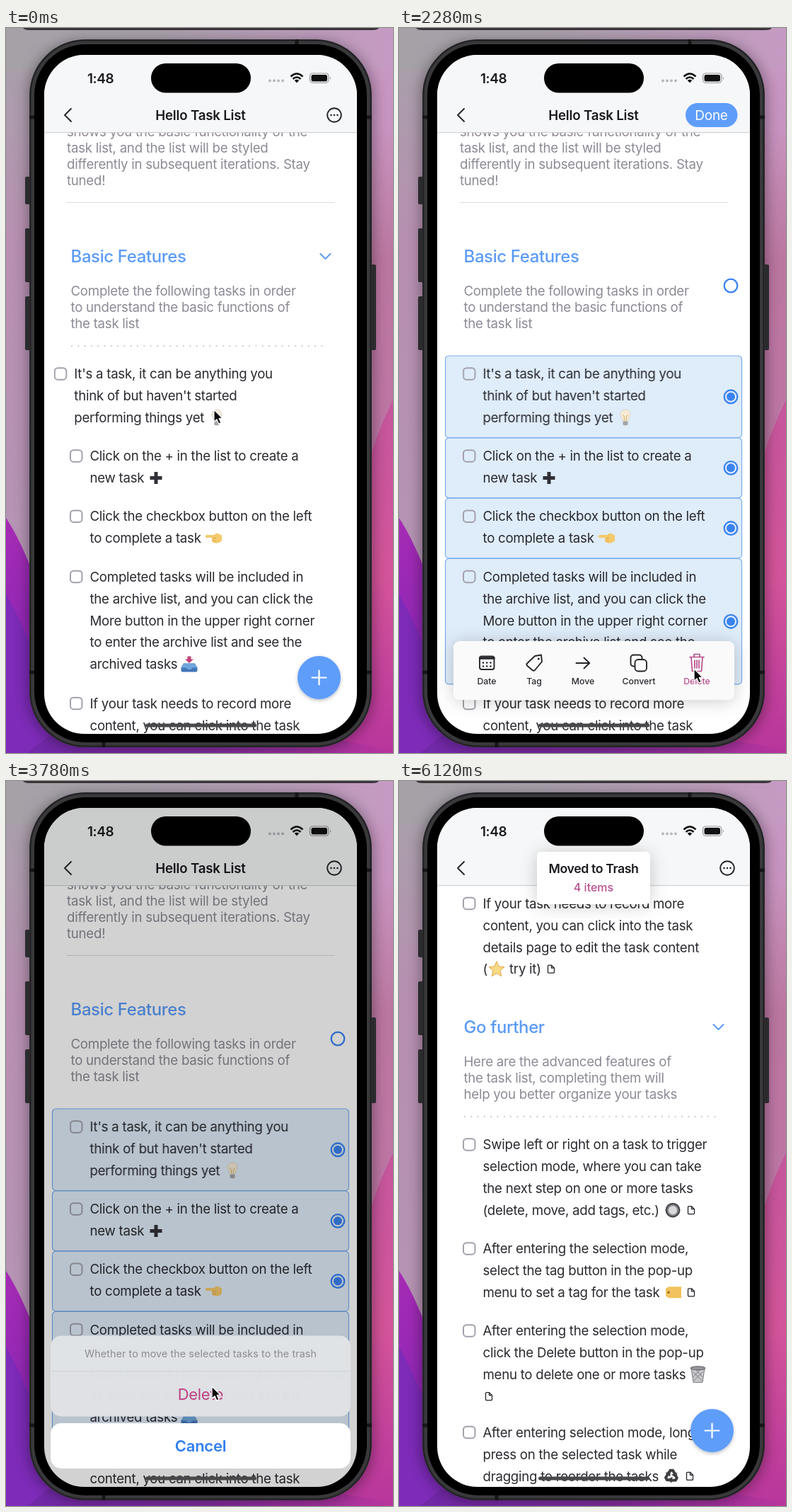
Recreate the animation shown at these times as an HTML page. Size 547 by 1024 pixels, loop 6.18 s.

```html
<!DOCTYPE html>
<html lang="en">
<head>
<meta charset="utf-8">
<title>Task list</title>
<style>
html, body { margin: 0; width: 100%; height: 100%; overflow: hidden; background: #b58aae; }
svg { display: block; width: 100vw; height: 100vh; }
text { font-family: Inter, Roboto, sans-serif; font-size: 18.7px; letter-spacing: -.015em; fill: #2a2a30; }
.note { fill: #8d8a95; }
.head { font-size: 24px; font-weight: 500; fill: #5b9bf8; letter-spacing: -.016em; }
.mid { text-anchor: middle; }
.bold { font-weight: 600; fill: #1b1b1f; letter-spacing: -.011em; }
.words { font-size: 17.8px; letter-spacing: -.024em; }
.label { font-size: 12.3px; font-weight: 500; letter-spacing: 0; }
.line { fill: none; stroke: #26262b; stroke-width: 1.9; stroke-linecap: round; stroke-linejoin: round; }
.box { fill: #dfecf9; stroke: #7aaef0; stroke-width: 1.2; }
.check { fill: none; stroke: #a3a1ac; stroke-width: 2; }
.ring { fill: none; stroke: #3a83f0; stroke-width: 2.3; }
.dot { fill: #3a83f0; }
.chev { fill: none; stroke: #5b9bf8; stroke-width: 2; stroke-linecap: round; stroke-linejoin: round; }
.dots { stroke: #d2d2d8; stroke-width: 2.4; stroke-linecap: round; stroke-dasharray: 0 9.3; }
.toast { transform-origin: 275px 137px; }
</style>
</head>
<body>
<svg viewBox="0 0 547 1024" preserveAspectRatio="none">
  <defs>
    <clipPath id="screen"><rect x="54" y="38" width="442" height="959" rx="57"/></clipPath>
    <linearGradient id="left" x2="0" y2="1">
      <stop offset="0" stop-color="#a5a1a7"/><stop offset=".1" stop-color="#ac9cac"/>
      <stop offset=".3" stop-color="#b78fb1"/><stop offset=".68" stop-color="#b593b4"/>
    </linearGradient>
    <linearGradient id="right" x2="0" y2="1">
      <stop offset="0" stop-color="#c69ac3"/><stop offset=".14" stop-color="#c793bf"/>
      <stop offset=".32" stop-color="#ba769f"/><stop offset=".52" stop-color="#bd76a4"/>
    </linearGradient>
    <linearGradient id="top"><stop offset="0" stop-color="#a5a1a7"/><stop offset=".4" stop-color="#a99fab"/><stop offset="1" stop-color="#c69ac3"/></linearGradient>
    <linearGradient id="floor"><stop offset="0" stop-color="#7028a8"/><stop offset=".5" stop-color="#7f2b9c"/><stop offset="1" stop-color="#b8359c"/></linearGradient>
    <linearGradient id="pink" x2="0" y2="1">
      <stop offset="0" stop-color="#c4579c"/><stop offset=".5" stop-color="#d4549a"/><stop offset="1" stop-color="#b8359c"/>
    </linearGradient>
    <linearGradient id="violet" x2="0" y2="1">
      <stop offset="0" stop-color="#a62bb4"/><stop offset=".5" stop-color="#9128b6"/><stop offset="1" stop-color="#6a2a9c"/>
    </linearGradient>
    <filter id="blur" x="-20%" y="-20%" width="140%" height="140%"><feGaussianBlur stdDeviation="9"/></filter>
    <filter id="shade" x="-30%" y="-60%" width="160%" height="220%"><feDropShadow dx="0" dy="2" stdDeviation="12" flood-opacity=".2"/></filter>
    <filter id="soft" x="-30%" y="-30%" width="160%" height="160%"><feDropShadow dx="0" dy="2" stdDeviation="2.5" flood-opacity=".25"/></filter>
  </defs>

  <rect width="275" height="1024" fill="url(#left)"/>
  <rect x="274" width="273" height="1024" fill="url(#right)"/>
  <rect width="547" height="60" fill="url(#top)"/>
  <path d="M0 692Q20 722 40 775V1024H0Z" fill="url(#violet)"/>
  <path d="M0 800Q22 835 70 960L300 1024H0Z" fill="#7d2bb8"/>
  <path d="M547 525Q520 580 505 640L400 1024H547Z" fill="url(#pink)"/>
  <path d="M60 1000H440L547 1020V1024H30Z" fill="url(#floor)"/>
  <rect x="30" y="18" width="490" height="1000" rx="78" opacity=".33" filter="url(#blur)"/>
  <path d="M24 0H527Q525 3 518 3H33Q26 3 24 0Z" fill="#3a3539"/>

  <g fill="#2b2b2e">
    <rect x="27" y="210" width="9" height="39" rx="2"/><rect x="27" y="283" width="9" height="76" rx="2"/>
    <rect x="27" y="379" width="9" height="76" rx="2"/><rect x="514" y="334" width="9" height="121" rx="2"/>
  </g>
  <rect x="33" y="16" width="484" height="1000" rx="79" fill="#39393c"/>
  <rect x="34.5" y="17.5" width="481" height="997" rx="77.5" fill="none" stroke="#202023" stroke-width="2"/>
  <path d="M33 126h7M33 910h7M510 126h7M510 910h7M138 1009v7M411 16v7" stroke="#161618" stroke-width="5"/>
  <rect x="40" y="23" width="470" height="986" rx="72"/>

  <g clip-path="url(#screen)">
    <rect x="54" y="38" width="442" height="959" fill="#fff"/>
    <g id="list"></g>
    <g class="fab">
      <circle cx="442.5" cy="917.5" r="30.5" fill="#5f9dfb" filter="url(#soft)"/>
      <path d="M432.5 917.5h20M442.5 907.5v20" stroke="#fff" stroke-width="2.2" stroke-linecap="round"/>
    </g>
    <rect x="54" y="38" width="442" height="109.5" fill="#f6f7f8"/>
    <path d="M54 147.7H496" stroke="#c9c9cd"/>
    <path class="line" d="M92 114l-9 9 9 9"/>
    <text class="mid bold" x="275" y="123" dy=".36em">Hello Task List</text>
    <g class="more">
      <circle class="line" cx="464" cy="123" r="9.8"/>
      <path class="line" d="M459.5 123h.01M464 123h.01M468.5 123h.01" style="stroke-width:2.6"/>
    </g>
    <g class="done">
      <rect x="405" y="106" width="73.5" height="34" rx="17" fill="#5f9dfb"/>
      <text class="mid" x="441.5" y="123" dy=".36em" style="fill:#fff;font-size:19px">Done</text>
    </g>
    <text class="bold" x="115" y="71" dy=".36em" style="font-size:19px;letter-spacing:-.024em">1:48</text>
    <path d="M373 74.5h.01M379 74.5h.01M385 74.5h.01M391 74.5h.01" stroke="#b9b9be" stroke-width="4" stroke-linecap="round"/>
    <path d="M402.5 68.5Q411 60.5 419.5 68.5M405.5 72Q411 67 416.5 72" fill="none" stroke="#111" stroke-width="2.6"/>
    <path d="M411 77.5l-3.2-3.5q3.2-2.5 6.4 0Z" fill="#111"/>
    <rect x="429.5" y="64" width="26.5" height="13.5" rx="4.2" fill="none" stroke="#96969b" stroke-width="1.2"/>
    <rect x="431.5" y="66" width="22.5" height="9.5" rx="2.5" fill="#111"/>
    <path d="M458 68.5q2 2.2 0 4.4Z" fill="#96969b"/>

    <g class="bar">
      <rect x="77" y="866" width="397" height="83" rx="9" fill="#fafafa" filter="url(#shade)"/>
      <g class="line">
        <rect x="114" y="887.5" width="20.5" height="18.5" rx="3"/>
        <path d="M114.5 890h19.5" stroke-width="3.5"/>
        <path d="M119 896.5h.01M124.2 896.5h.01M129.5 896.5h.01M119 901.5h.01M124.2 901.5h.01M129.5 901.5h.01" stroke-width="2.6"/>
        <path d="M192 887l9-1.5 1 9.500-10 12q-1.5 1.5-3.5 0l-7-6q-2-2-.5-3.5Z"/>
        <path d="M197.3 891h.01" stroke-width="3"/>
        <path d="M250.5 897h18.5M261.5 889.5l7.800 7.500-7.800 7.500"/>
        <rect x="327.5" y="885.5" width="16" height="16" rx="4"/>
        <rect x="333.5" y="892" width="16.5" height="16.5" rx="4.5" fill="#fafafa"/>
        <path d="M411 888.5h20M417 888v-3.5h8v3.5M413 889l1.5 19.5h13l1.5-19.5M418 893v11M421 893v11M424 893v11" stroke="#b9508f" stroke-width="1.7"/>
      </g>
      <text class="mid label" x="124" y="923" dy=".36em">Date</text>
      <text class="mid label" x="191" y="923" dy=".36em">Tag</text>
      <text class="mid label" x="260" y="923" dy=".36em">Move</text>
      <text class="mid label" x="339" y="923" dy=".36em">Convert</text>
      <text class="mid label" x="421" y="923" dy=".36em" style="fill:#b9508f">Delete</text>
    </g>

    <rect class="dim" x="54" y="38" width="442" height="959"/>
    <g class="sheet">
      <rect x="63" y="771.5" width="424" height="114" rx="15" fill="#e1e4e6" fill-opacity=".985"/>
      <path class="press" d="M63 821.5H487V870.5a15 15 0 0 1-15 15H78a15 15 0 0 1-15-15Z" fill="#d6d9dc"/>
      <path d="M63 821.5H487" stroke="#cfd1d4"/>
      <text class="mid note" x="275" y="797" dy=".36em" style="font-size:14.3px;letter-spacing:.007em">Whether to move the selected tasks to the trash</text>
      <text class="mid" x="275" y="854" dy=".36em" style="font-size:22px;fill:#bd3f80">Delete</text>
      <rect x="63" y="895" width="424" height="64" rx="15" fill="#fff"/>
      <text class="mid bold" x="275" y="927" dy=".36em" style="font-size:22px;fill:#2f7df0">Cancel</text>
    </g>
    <rect x="197" y="982.5" width="157" height="5" rx="2.5" fill="#48484b"/>

    <g class="toast">
      <g class="card">
        <rect x="195" y="100" width="160" height="74" rx="6" fill="#fff" filter="url(#shade)"/>
        <text class="mid" x="275" y="150" dy=".36em" style="font-size:16px;font-weight:500;letter-spacing:0;fill:#b9508f">4 items</text>
      </g>
      <text class="mid bold words" x="275" y="123.5" dy=".36em">Moved to Trash</text>
    </g>
  </g>
  <rect x="205" y="50" width="141" height="41.5" rx="20.75"/>
  <path class="cursor" d="M0 0V17.5L4 13.8 6.8 20 10 18.6 7.3 12.5H12.5Z" fill="#0b0b0c" stroke="#fff" stroke-width="1.3" stroke-linejoin="round"/>
</svg>

<script>
const LOOP = 6180, STEP = 30.9;
const list = document.getElementById('list');
const css = [];

// keys: { time in ms: declarations }
function keys(sel, frames) {
  const name = 'k' + css.length;
  const body = Object.entries(frames)
    .map(([ms, rule]) => `${(ms / LOOP * 100).toFixed(3)}%{${rule}}`).join('');
  css.push(`@keyframes ${name}{${body}}${sel}{animation:${name} ${LOOP}ms linear infinite both}`);
}
function fade(sel, ...pts) {
  const frames = {};
  for (const [ms, v] of [[0, pts[0][1]], ...pts, [LOOP, pts.at(-1)[1]]]) frames[ms] = `opacity:${v}`;
  keys(sel, frames);
}
const at = (x, y, extra = '') => `transform:translate(${x}px,${y}px)${extra}`;
const OUT = ';animation-timing-function:cubic-bezier(.2,.7,.3,1)';
const EASE = ';animation-timing-function:ease-in-out';

const glyphs = {
  bulb: '<path d="M-4 5C-4 1-7-1-7-4.5A7 7 0 0 1 7-4.5C7-1 4 1 4 5Z" fill="#f6ecd6" stroke="#d9d3c8"/><path d="M-1.5 4v-5l-2-3M1.5 4v-5l2-3" fill="none" stroke="#d8ab59"/><rect x="-3.5" y="5" width="7" height="6" rx="2" fill="#a4a4a8"/>',
  plus: '<path d="M-8.5 0h17M0-8.5v17" stroke="#303036" stroke-width="5"/>',
  hand: '<path d="M-11-4.5H0q3-3.5 6-2l5 2.5v8q-4 3.500-9 3-5-.5-5-3.500v-4h-8q-2.5-2-0-4Z" fill="#f5ca6c"/><path d="M-2 0h5M-2 3.5h5" stroke="#d9a24a"/>',
  tray: '<path d="M-8-1H8l3.5 6v4q0 2-2 2h-19q-2 0-2-2v-4Z" fill="#4377b8"/><path d="M-8-1H8l3 6H5q-5 5-10 0h-6Z" fill="#6fa5dd"/><path d="M-2.5-11h5v4h3.5L0-1.5-6-7h3.5Z" fill="#bf4178"/>',
  star: '<path d="M0-11L3.2-3.8 11-3 5.2 2.2 6.8 10 0 6-6.8 10-5.2 2.2-11-3-3.2-3.8Z" fill="#f8d985" stroke="#e0a948"/>',
  knob: '<circle r="10.5" fill="#4b4b50"/><circle r="7" fill="#d9d9dc" stroke="#8c8c91" stroke-width="2"/>',
  tag: '<path d="M-11-5l4-3H11V8H-7l-4-3Z" fill="#f2c35c"/><circle cx="-7" r="1.8" fill="#9a7128"/>',
  bin: '<path d="M-9.5-9L-6.5 11h13L9.5-9Z" fill="#c9c9cc" stroke="#77777c"/><path d="M-7-4L6 9M-3-7L7 4M7-4L-6 9M3-7L-7 4" stroke="#77777c"/><ellipse cy="-9" rx="10.5" ry="2.5" fill="#98989d" stroke="#55555a"/>',
  cycle: [0, 120, 240].map(a => `<g transform="rotate(${a})"><path d="M-5-3L-1.5-8H2L5-3" fill="none" stroke="#3e3e43" stroke-width="4"/><path d="M8.5-5L6 2 0-2Z" fill="#3e3e43"/></g>`).join(''),
  page: '<path class="line" d="M-4.5-4q0-1.5 1.5-1.5H.5L4.5-1.5V4q0 1.5-1.5 1.5H-3q-1.5 0-1.5-1.5ZM.5-5.5v4h4" style="stroke-width:1.3"/>'
};
const glyph = (name, x, y) => `<g transform="translate(${x},${y})">${glyphs[name]}</g>`;
const label = (x, y, s, cls = '') => `<text class="${cls}" x="${x}" y="${y}" dy=".36em">${s}</text>`;
const para = (x, y, gap, lines, cls) => lines.map((s, i) => label(x, y + i * gap, s, cls)).join('');
const add = html => list.insertAdjacentHTML('beforeend', html);
const ring = (y, cls = 'mode') => `<circle class="ring ${cls}" cx="469" cy="${y}" r="9.3"/>`;

function task(id, y, lines, icons) {
  const h = lines.length * STEP + 22.9, top = y - 25.5, mid = top + h / 2;
  add(`<g class="${id}">
    <rect class="box ${id}box" x="65.5" y="${top}" width="419" height="${h}" rx="5"/>
    <g class="${id}in"><rect class="check" x="91" y="${y - 8.3}" width="16.5" height="16.5" rx="4.5"/>
    ${para(118.5, y, STEP, lines, '')}
    ${icons.map(([n, x, row]) => glyph(n, x, y + row * STEP)).join('')}</g>
    ${ring(mid)}<circle class="dot ${id}dot" cx="469" cy="${mid}" r="6"/></g>`);
}
function section(id, y, title, lines, extra) {
  add(`<g class="${id}">${label(91.5, y, title, 'head')}
    <g class="${id}desc">${label(91.5, y + 49, lines[0], 'note')}</g>
    <g class="${id}rest">${para(91.5, y + 72, 23, lines.slice(1), 'note')}</g>
    <path class="chev ${id}chev" d="M444.5 ${y - 3}l7 7 7-7"/>
    <path class="dots ${id}dots" d="M93 ${y + 127}H455"/>${extra}</g>`);
}

add(`<g class="intro">${para(86, 146, 23, ['shows you the basic functionality of the', 'task list, and the list will be styled',
  'differently in subsequent iterations. Stay', 'tuned!'], 'note')}<path d="M86 246.5H465" stroke="#dcdce0"/></g>`);
section('one', 322, 'Basic Features', ['Complete the following tasks in order', 'to understand the basic functions of', 'the task list'], ring(364));
task('a', 488.5, ["It's a task, it can be anything you", "think of but haven't started", 'performing things yet'], [['bulb', 320, 2]]);
task('b', 604.5, ['Click on the + in the list to create a', 'new task'], [['plus', 212, 1]]);
task('c', 689.7, ['Click the checkbox button on the left', 'to complete a task'], [['hand', 294, 1]]);
task('d', 775, ['Completed tasks will be included in', 'the archive list, and you can click the', 'More button in the upper right corner',
  'to enter the archive list and see the', 'archived tasks'], [['tray', 259, 4]]);
task('g', 660.5, ['After entering the selection mode,', 'select the tag button in the pop-up', 'menu to set a tag for the task'], [['tag', 388, 2], ['page', 413, 2]]);
task('f', 513.5, ['Swipe left or right on a task to trigger', 'selection mode, where you can take', 'the next step on one or more tasks',
  '(delete, move, add tags, etc.)'], [['knob', 387, 3], ['page', 413, 3]]);
section('two', 347, 'Go further', ['Here are the advanced features of', 'the task list, completing them will', 'help you better organize your tasks'], '');
task('e', 954, ['If your task needs to record more', 'content, you can click into the task', 'details page to edit the task content',
  '(<tspan x="156">try it)</tspan>'], [['star', 138, 3], ['page', 215, 3]]);
task('h', 776.5, ['After entering the selection mode,', 'click the Delete button in the pop-up', 'menu to delete one or more tasks', ''], [['bin', 422.5, 2], ['page', 127, 3]]);
task('i', 920, ['After entering selection mode, long', 'press on the selected task while', 'dragging to reorder the tasks'], [['cycle', 385, 2], ['page', 411, 2]]);

// swipe, then selection mode
keys('.ain', {
  0: at(-22, 0), 120: at(-44, 0), 240: at(-48, 0, OUT), 450: at(0, 0),
  4020: at(0, 0, ';opacity:1'), 4140: at(0, 0, ';opacity:.6'), [LOOP]: at(0, 0, ';opacity:.6')
});
fade('.bin,.cin,.din', [4020, 1], [4140, .6]);
fade('.mode', [240, 0], [420, 1], [4150, 1], [4340, 0]);
fade('.onechev,.onedots', [240, 1], [400, 0]);
fade('.done', [240, 0], [360, 1], [2440, 1], [2560, 0]);
fade('.more', [240, 1], [360, 0], [2440, 0], [2560, 1]);
fade('.fab', [240, 1], [360, 0], [4110, 0], [4140, .06], [4340, 1]);
keys('.bar', { 0: at(0, 170), 240: at(0, 170, OUT), 540: at(0, 0), 2420: at(0, 0, EASE), 2640: at(0, 170), [LOOP]: at(0, 170) });
[['a', 270], ['b', 780], ['c', 1240], ['d', 1640]].forEach(([id, ms]) => {
  fade(`.${id}box`, [ms, 0], [ms + 60, .15], [ms + 170, 1]);
  fade(`.${id}dot`, [ms, 0], [ms + 60, .55], [ms + 150, 1]);
});
fade('.ebox,.edot', [0, 0]);

// confirmation sheet
fade('.dim', [2440, 0], [2640, .215], [3740, .215], [3980, 0]);
keys('.sheet', { 0: at(0, 240), 2440: at(0, 240, OUT), 2780: at(0, 0), 3740: at(0, 0, EASE), 4000: at(0, 240), [LOOP]: at(0, 240) });
fade('.press', [3540, 0], [3600, .4], [3740, .4], [3800, 0]);

// rows close up
function slide(id, from, mid, to, o0, o1, o2) {
  const pose = (y, o, x = '') => at(0, y, `;opacity:${o}${x}`);
  keys('.' + id, { 0: pose(from, o0), 4020: pose(from, o0), 4140: pose(mid, o1, OUT), 4440: pose(to, o2), [LOOP]: pose(to, o2) });
}
slide('a', 0, -315.5, -573, 1, .9, 0);
slide('b', 0, -343.5, -624, 1, .8, 0);
slide('c', 0, -364.5, -664, 1, .8, 0);
slide('d', 0, -386, -702, 1, .9, 0);
slide('e', 0, -430, -781, 1, 1, 1);
slide('f', -596, -268.5, 0, 0, 1, 1);
slide('g', -693, -312, 0, 0, 1, 1);
fade('.h,.i', [4020, 0], [4130, 1]);
fade('.intro,.one', [4020, 1], [4120, 0]);
fade('.two', [4020, 0], [4140, .9], [4200, 1]);
fade('.tworest', [4150, 0], [4300, 1]);
for (const [sel, y] of [['.twodesc', -7], ['.twodots', -64]])
  keys(sel, { 0: at(0, y), 4140: at(0, y, OUT), 4380: at(0, 0), [LOOP]: at(0, 0) });
css.push('.fbox,.gbox{fill-opacity:.65}.hbox,.ibox{fill:#eaeff6;fill-opacity:.7}');
fade('.fbox,.gbox,.hbox,.ibox', [4140, .9], [4360, 0]);
fade('.fdot,.gdot,.hdot,.idot', [4140, .8], [4320, 0]);

// toast
const grow = (y, s, x = '') => `transform:translate(0,${y}px) scale(${s})${x}`;
keys('.toast', { 0: grow(-44, .45), 4560: grow(-44, .45), 4620: grow(-30, .59), 4800: grow(1, 1.02, EASE), 4920: grow(0, 1), [LOOP]: grow(0, 1) });
fade('.card', [4570, 0], [4620, .08], [4740, 1]);
fade('.words', [4560, 0], [4620, .6], [4720, 1]);

keys('.cursor', {
  0: at(294, 539), 120: at(272, 540), 240: at(268, 541, EASE), 720: at(466, 643), 960: at(466, 643, EASE),
  1180: at(466, 716), 1340: at(466, 716, EASE), 1580: at(466, 838), 1780: at(466, 838, EASE), 2180: at(417, 905),
  2700: at(417, 905, EASE), 3420: at(291, 855), 5399: at(291, 855), 5400: at(600, 855), [LOOP]: at(600, 855)
});

const rules = document.createElement('style');
rules.textContent = css.join('\n');
document.head.append(rules);
</script>
</body>
</html>
```
